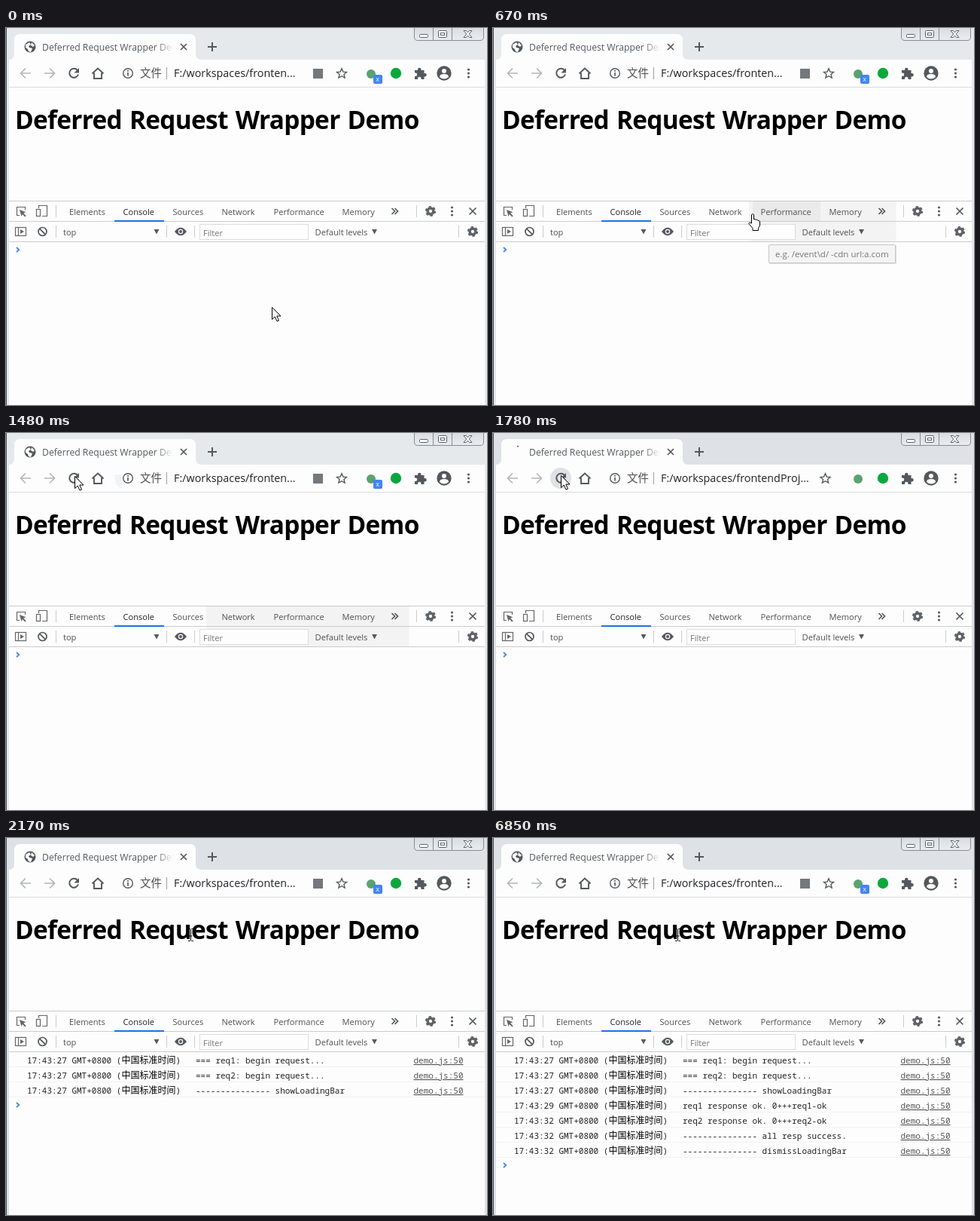
Animation of 639 by 500 pixels, one loop 8000 ms. Source, as an HTML page:

```html
<!DOCTYPE html>
<html lang="en">
<head>
<meta charset="utf-8">
<title>Deferred Request Wrapper Demo</title>
<style>
  html, body { margin: 0; width: 100%; height: 100%; overflow: hidden; background: #fdfdfd; }
  svg { display: block; }
  text { font: 11.1px "Open Sans", "Noto Sans", sans-serif; fill: #505050; white-space: pre; }
  .cjk { font-family: "Noto Sans CJK SC", "Noto Sans CJK", sans-serif; }
  .title { font-size: 12.2px; fill: url(#fade); }
  .url { font-size: 14.35px; fill: #202124; }
  .h1 { font-size: 33.4px; font-weight: 700; letter-spacing: -.7px; word-spacing: 2px; fill: #000; }
  .log text { font: 11px "Noto Sans Mono", "DejaVu Sans Mono", monospace; fill: #222; }
  .log .cjk { font: 12px "Noto Sans CJK SC", "Noto Sans CJK", sans-serif; fill: #000; }
  .log .link { fill: #545454; text-decoration: underline; }
  .line { fill: none; stroke: #54585d; stroke-width: 1.7; }
  .thin { fill: none; stroke: #666; stroke-width: 1.2; }
  .rule { fill: none; stroke: #ccc; }
  .solid { fill: #54585d; }
  .pointer { fill: #fff; stroke: #000; stroke-linejoin: round; }
</style>
</head>
<body>
<svg width="639" height="500" viewBox="0 0 639 500">
  <defs>
    <linearGradient id="fade" gradientUnits="userSpaceOnUse" x1="200" x2="222" y1="0" y2="0">
      <stop stop-color="#54585d"/><stop offset="1" stop-color="#54585d" stop-opacity="0"/>
    </linearGradient>
    <linearGradient id="glass" x2="0" y2="1">
      <stop stop-color="#d9dde2"/><stop offset="1" stop-color="#e9ecf0"/>
    </linearGradient>
    <g id="gear" fill="none" stroke="#5f6368">
      <circle r="3.900" stroke-width="3.500"/>
      <circle r="6" stroke-width="2.200" stroke-dasharray="3.2 3.083"/>
    </g>
    <g id="dots" class="solid">
      <circle cy="-5" r="1.6"/><circle r="1.6"/><circle cy="5" r="1.6"/>
    </g>
  </defs>

  <!-- window -->
  <rect id="frame" width="639" height="500"/>
  <path d="M.5 0V500" stroke="#46525e"/>
  <rect x="4" y="42" width="632" height="458" fill="#fdfdfd"/>
  <path d="M4 42Q11 42 11 34V16Q11 8 19 8H244Q252 8 252 16V34Q252 42 260 42Z" fill="#fdfdfd"/>
  <path d="M542.500 0V12Q542.500 16.500 547 16.500H630Q634.500 16.500 634.500 12V0" fill="url(#glass)" stroke="#868c94"/>
  <path d="M567.500 0V16M592.500 0V16" stroke="#868c94"/>
  <g fill="#fff" stroke="#5b616b">
    <rect x="549.500" y="8.500" width="11" height="4" rx="1"/>
    <rect x="574.500" y="3.500" width="11" height="9" rx="1"/>
    <rect x="577.500" y="6.500" width="5" height="3"/>
    <path d="M608 3.500h3.500l2 2.500 2-2.500h3.500l-3.800 4.500 3.800 4.500h-3.500l-2-2.500-2 2.500H608l3.800-4.500Z"/>
  </g>

  <!-- tab -->
  <g data-at="0-1780 2050-8000">
    <circle cx="32" cy="25" r="7.500" class="solid"/>
    <path d="M26 22l5-3 2 3-3 2 1 2 4 1-2 5-3-1-1-3-3-2zM34 19l4 4-2 2-3-2z" fill="#fdfdfd"/>
  </g>
  <path data-at="1780-2050" d="M32 17.500q1 0 2 .5" class="line"/>
  <text x="48" y="29.500" class="title">Deferred Request Wrapper Demo</text>
  <path d="M232 21l8 8M240 21l-8 8" class="line"/>
  <path d="M268 25h12M274 19v12" class="line" style="stroke-width:2"/>

  <!-- toolbar -->
  <path d="M4 78.500H636" stroke="#dadce0"/>
  <path data-at="1330-1630" d="M154 55H145Q142 68 154 74Z" fill="#f1f3f4"/>
  <circle data-at="1630-1930" cx="90" cy="60" r="14" fill="#dfe1e4"/>
  <path d="M33 60H20M26 53.500L19.500 60l6.500 6.500M51 60H64M58 53.500l6.500 6.500-6.500 6.500" class="line" style="stroke:#b4b7ba"/>
  <path d="M94.800 55.800A6 6 0 1 0 96 61.500" class="line" style="stroke-width:2"/>
  <path d="M97 53v6.500h-6.500z" class="solid"/>
  <path d="M114.500 60.500L122 53.500l7.500 7M117 59.500V67H127V59.500" class="line" style="stroke-width:1.900"/>
  <circle cx="162" cy="60" r="6.300" class="line" style="stroke-width:1.400"/>
  <path d="M162 59v4.500M162 56v1.700" class="line"/>
  <text x="178" y="65.300" class="cjk" style="font-size:14.500px">文件</text>
  <path d="M213.500 52V68" stroke="#9aa0a6"/>
  <text data-at="0-1780 1930-8000" x="223" y="65" class="url">F:/workspaces/fronten...</text>
  <text data-at="1780-1930" x="223" y="65" class="url">F:/workspaces/frontendProj...</text>
  <rect data-at="0-1780 1930-8000" x="408" y="54" width="13" height="13" fill="#74787c"/>
  <path id="star" d="M0-6.500L1.900-2.200 6.500-1.800 3 1.300 4.100 5.800 0 3.400-4.100 5.800-3 1.300-6.500-1.800-1.900-2.200Z" class="line" style="stroke-width:1.400"/>
  <circle cx="485" cy="61" r="6" fill="#5ba26f"/>
  <g data-at="0-1780 1930-8000">
    <rect x="488" y="62" width="12" height="12" rx="2" fill="#4285f4"/>
    <text x="491.300" y="71" style="font-size:9px;fill:#fff">x</text>
  </g>
  <circle cx="518" cy="60" r="7.200" fill="#0aa83c"/>
  <path d="M543 56h4v-1a2 2 0 0 1 4.500 0v1h4v4h1a2 2 0 0 1 0 4.500h-1V68h-4v-1a2 2 0 0 0-4.500 0v1h-4v-4h1a2 2 0 0 0 0-4.500h-1z" class="solid"/>
  <circle cx="582" cy="60" r="9.700" class="solid"/>
  <circle cx="582" cy="57" r="3" fill="#fdfdfd"/>
  <path d="M576 65q0-4 6-4t6 4q-6 5-12 0z" fill="#fdfdfd"/>
  <use href="#dots" x="614.500" y="60"/>

  <text x="12" y="134" class="h1">Deferred Request Wrapper Demo</text>

  <!-- devtools -->
  <rect data-at="550-820" x="340" y="230" width="195.500" height="53" fill="#f3f3f3"/>
  <rect data-at="820-1630" x="266" y="230" width="269.500" height="53" fill="#f3f3f3"/>
  <rect data-at="550-820" x="345" y="230" width="90" height="26" fill="#eaeaea"/>
  <path d="M4 229.500H636M4 256.500H636M4 283.500H636M66.500 235v16M545.500 235v16M66.500 262v16M213.500 262v16M250.500 262v16M601.500 262v16" class="rule"/>
  <rect x="144" y="255" width="66" height="2" fill="#1a73e8"/>
  <g id="tabs"></g>
  <path d="M18 248.500H14.500V237.500H25.500V241M43.500 239V235.500H54.500V249.500H48" class="thin"/>
  <rect x="40.500" y="240.500" width="5" height="9" class="thin"/>
  <path d="M18 241l8.500 3.300-3.300 1.300 3.500 3.600-1.400 1.400-3.500-3.600-1.300 3z" fill="#666"/>
  <path d="M512.500 239l4 4-4 4M516.500 239l4 4-4 4" class="line"/>
  <path d="M615.500 238.500l9 9M624.500 238.500l-9 9" class="line"/>
  <use href="#gear" x="564" y="243"/>
  <use href="#dots" x="592.500" y="243"/>
  <use href="#gear" x="620" y="270"/>
  <rect x="12.500" y="264.500" width="14" height="11" class="thin"/>
  <path d="M16.500 264.500v11" class="thin"/>
  <path d="M19 267v6l5-3z" fill="#666"/>
  <g class="line"><circle cx="48.500" cy="270" r="5.500"/><path d="M44.600 266.100l7.800 7.800"/></g>
  <text x="76" y="275">top</text>
  <path d="M196.500 267h7l-3.500 6.500zM486 267h7l-3.500 6.500z" fill="#5a5a5a"/>
  <path d="M224 270q8-10.500 16 0q-8 10.500-16 0z" class="solid"/>
  <circle cx="232" cy="270" r="3.200" fill="#fdfdfd"/><circle cx="232" cy="270" r="2" class="solid"/>
  <rect x="257.500" y="260.500" width="144" height="20" fill="#fdfdfd" stroke="#ddd"/>
  <text x="262" y="275.500" style="fill:#777">Filter</text>
  <text x="410.500" y="275" style="font-size:11.200px">Default levels</text>

  <g id="log" class="log"></g>
  <path id="prompt" d="M0-3L3.300 0 0 3" fill="none" stroke="#4285e0" stroke-width="1.700"/>

  <g data-at="550-820">
    <rect x="367" y="288" width="169" height="25" fill="#000" opacity=".12"/>
    <rect x="366.500" y="287.500" width="168" height="24" rx="1" fill="#f4f4f4" stroke="#c6c6c6"/>
    <text x="375" y="304" style="font-size:11.500px;fill:#777">e.g. /event\d/ -cdn url:a.com</text>
  </g>

  <!-- pointers -->
  <path id="arrow" class="pointer" d="M.5.5V16.500L4.200 13 7 19 9.500 18 6.800 12H12Z"/>
  <path id="hand" class="pointer" d="M4.500 14V2.500Q6 .5 7.500 2.500V9Q9 7.500 10.500 9.500 12 8.500 13.200 10.500 15 9.800 15.500 12V17L13.500 20.500V23.500H6V20.500L.8 14.500Q1 12 4.500 14Z"/>
  <path id="beam" d="M-3.500-8H-1L0-7 1-8H3.500M0-7V7M-3.500 8H-1L0 7 1 8H3.500M-2 1.500H2" fill="none" stroke="#000"/>
</svg>
<script>
const LOOP = 8000;
const $ = id => document.getElementById(id);

const tabs = [[84, 'Elements'], [155.5, 'Console'], [221.5, 'Sources'], [286.5, 'Network'], [355.5, 'Performance'], [446.5, 'Memory']];
$('tabs').innerHTML = tabs.map(([x, name]) =>
  `<text x="${x}" y="248"${name === 'Console' ? ' style="fill:#222"' : ''}>${name}</text>`).join('');

const dashes = '-'.repeat(15);
const logs = [
  [1930, 27, '=== req1: begin request...'],
  [1930, 27, '=== req2: begin request...'],
  [1930, 27, dashes + ' showLoadingBar'],
  [3950, 29, 'req1 response ok. 0+++req1-ok'],
  [6850, 32, 'req2 response ok. 0+++req2-ok'],
  [6850, 32, dashes + ' all resp success.'],
  [6850, 32, dashes + ' dismissLoadingBar']
];
$('log').innerHTML = logs.map(([at, sec, msg], i) => {
  const y = 299 + 20 * i;
  return `<g data-at="${at}-${LOOP}">
    <path d="M4 ${y + 4.5}H636" stroke="#f2f2f2"/>
    <text x="28" y="${y}">17:43:${sec} GMT+0800 (<tspan class="cjk">中国标准时间</tspan>)</text>
    <text x="252" y="${y}">${msg}</text>
    <text x="541.5" y="${y}" class="link">demo.js:50</text></g>`;
}).join('');

const pointer = [
  [0, 'arrow', 353, 370], [400, ''], [550, 'hand', 353, 258], [670, 'hand', 339, 245],
  [820, 'arrow', 280, 222], [940, 'arrow', 229, 160], [1060, 'arrow', 181, 112],
  [1180, 'arrow', 141, 77], [1330, 'arrow', 108, 64], [1480, 'arrow', 91, 57],
  [1780, 'arrow', 90, 56], [1930, 'arrow', 146, 84], [2050, 'beam', 205, 112], [2170, 'beam', 245.5, 128.5]
];
const promptY = [[0, 294], [1930, 354], [3950, 374], [6850, 434]];

const timed = [...document.querySelectorAll('[data-at]')].map(el =>
  [el, el.dataset.at.split(' ').map(span => span.split('-').map(Number))]);

const current = (steps, t) => steps.filter(s => s[0] <= t).pop();
const place = (id, x, y) => $(id).setAttribute('transform', `translate(${x} ${y})`);

function draw(t) {
  for (const [el, spans] of timed)
    el.style.display = spans.some(([on, off]) => t >= on && t < off) ? '' : 'none';
  $('frame').setAttribute('fill', t < 1630 ? '#e6e9ec' : '#dee1e6');
  place('star', t >= 1780 && t < 1930 ? 441.5 : 446, 60.3);
  place('prompt', 14, current(promptY, t)[1]);
  const [, shape, x, y] = current(pointer, t);
  for (const id of ['arrow', 'hand', 'beam']) $(id).style.display = id === shape ? '' : 'none';
  if (shape) place(shape, x, y);
}

const start = performance.now();
function tick() {
  draw((performance.now() - start) % LOOP);
  requestAnimationFrame(tick);
}
tick();
</script>
</body>
</html>
```
